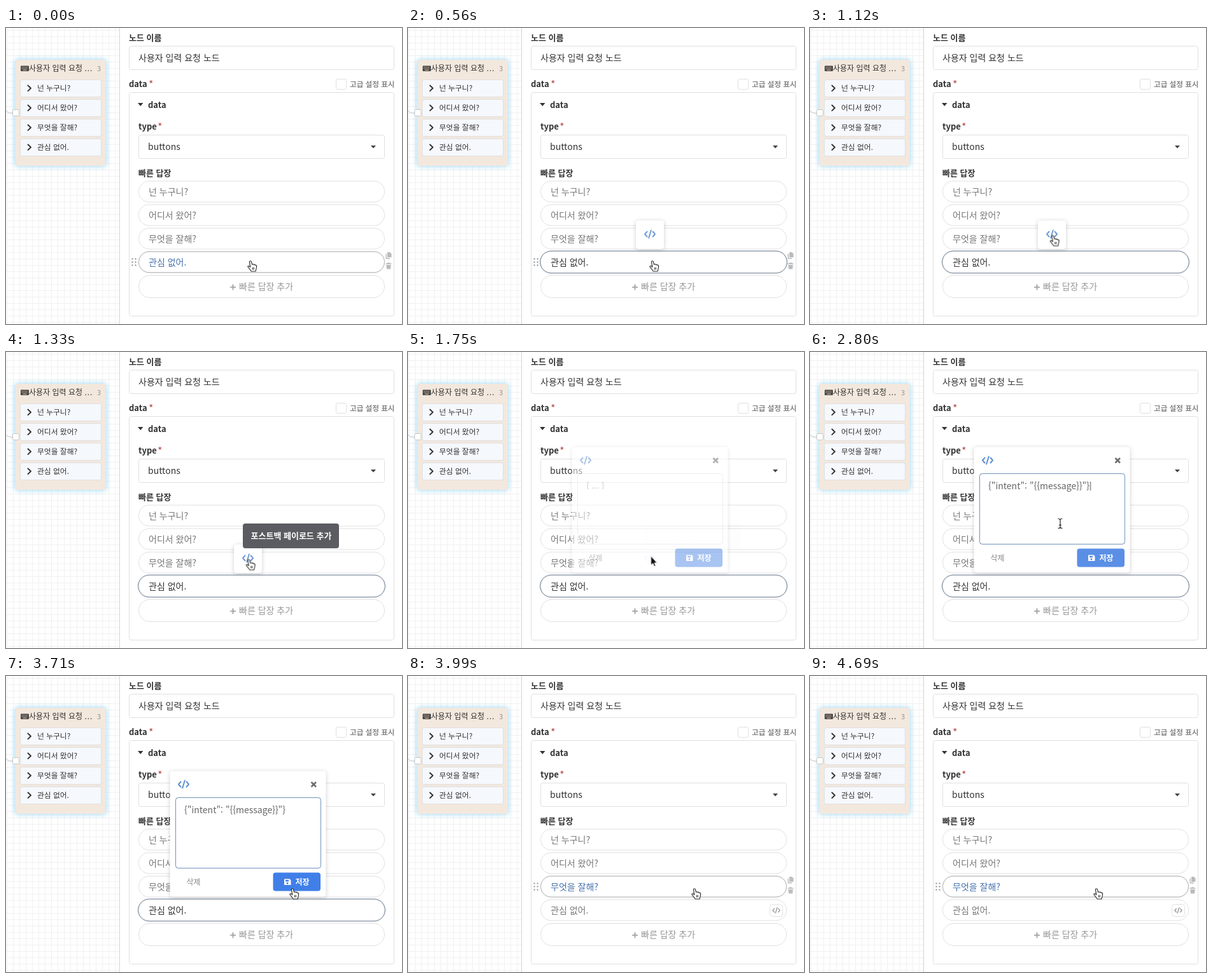
These frames come from a looping animation (622 px wide and 466 px high, 4.76 s). An HTML page:

```html
<!DOCTYPE html>
<html lang="ko">
<head>
<meta charset="utf-8">
<title>빠른 답장 편집</title>
<style>
html, body { margin: 0; width: 100%; height: 100%; overflow: hidden; background: #fff; }
svg { display: block; width: 622px; height: 466px; }
text { font: 14px "Noto Sans CJK KR", "Noto Sans CJK JP", "Noto Sans CJK", sans-serif; fill: #333; white-space: pre; }
.label { font-size: 13px; font-weight: 700; }
.small { font-size: 12px; }
.item { font-size: 11.8px; }
.bold { font-weight: 700; }
.req { font-size: 13px; fill: #c0585c; font-weight: 700; }
.option { fill: #777; }
.box { fill: #fff; stroke: #e0e0e0; }
.hovered { fill: none; stroke: #b2b2b2; }
.focused { fill: none; stroke: #6c8096; }
.field { fill: none; stroke: #6f93bd; }
.line { fill: none; stroke-linecap: round; stroke-linejoin: round; }
.card { fill: #fff; filter: drop-shadow(0 1px 3px rgba(0, 0, 0, .2)); }
.node { fill: #f3e8dd; filter: drop-shadow(0 0 4px #8fd5f7); }

/* one timeline: 1% = 47.6ms */
.anim, .anim-hard { animation: 4760ms linear infinite; }
.anim-hard { animation-timing-function: step-end; }

.tools4 { animation-name: tools4; }
@keyframes tools4 { 0% { opacity: 1 } 17.65%, 100% { opacity: 0 } }
.edge4 { animation-name: edge4; }
@keyframes edge4 { 0%, 2.9% { opacity: 1 } 5.9%, 100% { opacity: 0 } }
.focus4 { animation-name: focus4; }
@keyframes focus4 { 0%, 2.9% { opacity: 0 } 5.9%, 79.4% { opacity: 1 } 83%, 100% { opacity: 0 } }
.text4 { animation-name: text4; }
@keyframes text4 { 0%, 2.9% { fill: #4672ae } 5.9%, 79.4% { fill: #333 } 83%, 100% { fill: #777 } }
.text3 { animation-name: text3; }
@keyframes text3 { 0%, 80.8% { fill: #777 } 84%, 100% { fill: #4672ae } }
.late { animation-name: late; }
@keyframes late { 0%, 80.8% { opacity: 0 } 84%, 100% { opacity: 1 } }

.popup { animation-name: popup; }
@keyframes popup { 0%, 4.4% { opacity: 0 } 7.4%, 35.2% { opacity: 1 } 37%, 100% { opacity: 0 } }
.tip { animation-name: tip; }
@keyframes tip { 0%, 25.8% { opacity: 0 } 27.9%, 33.8% { opacity: 1 } 36.8%, 100% { opacity: 0 } }
.dialog { animation-name: dialog; }
@keyframes dialog { 0%, 35.2% { opacity: 0 } 38.2%, 79.4% { opacity: 1 } 82.4%, 100% { opacity: 0 } }
.edit { animation-name: edit; }
@keyframes edit { 0%, 50% { opacity: 0 } 52.9%, 100% { opacity: 1 } }
.hint { animation-name: hint; }
@keyframes hint { 0% { opacity: 1 } 58.8%, 100% { opacity: 0 } }
.typed { animation-name: typed; }
@keyframes typed { 0% { opacity: 0 } 58.8%, 100% { opacity: 1 } }
.caret { animation-name: caret; }
@keyframes caret {
  0% { opacity: 0; transform: translateX(281px) }
  51.4% { opacity: 1; transform: translateX(281px) }
  58.8% { opacity: 1; transform: translateX(440.5px) }
  70.5%, 100% { opacity: 0; transform: translateX(440.5px) }
}
.save { animation-name: save; }
@keyframes save { 0%, 66% { fill: #5a8fe6 } 69.1%, 100% { fill: #407fe8 } }

.pointer { animation-name: pointer; }
@keyframes pointer {
  0%, 14.7% { transform: translate(384px, 366.7px); animation-timing-function: ease-in-out }
  22%, 44% { transform: translate(381.5px, 326.7px); animation-timing-function: ease-in-out }
  51.4%, 58.9% { transform: translate(393px, 270px); animation-timing-function: ease-in-out }
  69.1%, 100% { transform: translate(450px, 334.7px) }
}
.hand { animation-name: hand; }
@keyframes hand { 0% { opacity: 1 } 36.7% { opacity: 0 } 66.2%, 100% { opacity: 1 } }
.arrow { animation-name: arrow; }
@keyframes arrow { 0% { opacity: 0 } 36.7% { opacity: 1 } 47.5% { opacity: 0 } 64% { opacity: 1 } 66.2%, 100% { opacity: 0 } }
.beam { animation-name: beam; }
@keyframes beam { 0% { opacity: 0 } 47.5% { opacity: 1 } 64%, 100% { opacity: 0 } }
</style>
</head>
<body>
<svg viewBox="0 0 622 466">
  <defs>
    <pattern id="grid" width="10" height="10" x="1" y="3" patternUnits="userSpaceOnUse">
      <path d="M.5 0V10M0 .5H10" stroke="#f1f1f1" fill="none"/>
    </pattern>
    <g id="code" class="line" stroke-width="2">
      <path d="M-4.5-4L-8 0L-4.5 4M4.5-4L8 0L4.5 4M1.8-6L-1.8 6"/>
    </g>
    <g id="tools">
      <path d="M197.5 363.5h2m3 0h2m-7 5h2m3 0h2m-7 5h2m3 0h2" stroke="#8c8c8c" stroke-width="2"/>
      <path d="M599 353h4l2.5 2.5V361H599ZM596.5 355.5H598V362h5v1.5h-6.5Z" fill="#bbb"/>
      <path d="M596.5 370.5h2.5v-1h4v1h2.5v1.500h-9ZM597.3 373h7.4l-.6 6.5h-6.2Z" fill="#bbb"/>
    </g>
    <rect id="pill" x="208.5" width="386" height="33" rx="16.5"/>
  </defs>

  <rect width="178" height="466" fill="url(#grid)"/>
  <path d="M178.5 0V466" stroke="#d3d3d3"/>
  <path d="M0 130Q4 135 11 134" stroke="#b9c8d2" fill="none"/>
  <rect class="node" x="14.5" y="50" width="142.5" height="167" rx="4"/>
  <rect x="10.5" y="128.5" width="10" height="10" rx="2" fill="#fff" stroke="#c9c5c0"/>
  <rect x="23" y="59.5" width="13" height="8.5" rx="1" fill="#494541"/>
  <path d="M24.5 61.8h10m-10 2h10" stroke="#e5dad0" stroke-dasharray="1 1"/>
  <path d="M26.5 66.2h6" stroke="#e5dad0"/>
  <text class="small" x="36" y="68">사용자 입력 요청 <tspan letter-spacing="1">...</tspan></text>
  <text x="143" y="68" style="font-size:11px;fill:#9a9188">3</text>
  <g id="items"></g>

  <text class="label" x="193" y="19.5">노드 이름</text>
  <rect class="box" x="193.5" y="28.5" width="416" height="37" rx="3"/>
  <text x="208" y="52">사용자 입력 요청 노드</text>
  <text class="label" x="193" y="93">data</text>
  <text class="req" x="224.5" y="92">*</text>
  <rect class="box" x="518.5" y="80.5" width="16" height="16" rx="2"/>
  <text class="bold" x="540" y="92.5" style="font-size:11.6px;fill:#888">고급 설정 표시</text>
  <rect class="box" x="193.5" y="101.5" width="416" height="352" rx="3"/>
  <path d="M207 118h8.500l-4.250 5Z" fill="#333"/>
  <text class="label" x="223" y="126">data</text>
  <text class="label" x="208" y="160">type</text>
  <text class="req" x="238.5" y="159">*</text>
  <rect class="box" x="208.5" y="168.5" width="386" height="37" rx="3"/>
  <text x="223" y="192">buttons</text>
  <path d="M573 185h8l-4 4.500Z" fill="#444"/>
  <text class="label" x="208" y="233">빠른 답장</text>

  <g id="options"></g>
  <rect class="box" x="208.5" y="389.5" width="386" height="35" rx="17.5"/>
  <path d="M352 408h9m-4.500-4.500v9" stroke="#999" stroke-width="1.6"/>
  <text x="366" y="412" style="fill:#999">빠른 답장 추가</text>

  <use href="#pill" y="352" class="hovered anim edge4"/>
  <rect class="focused anim focus4" x="207.5" y="351" width="388" height="35" rx="17.5"/>
  <use href="#tools" class="anim-hard tools4"/>
  <g class="anim late">
    <use href="#pill" y="315" class="hovered"/>
    <use href="#tools" y="-37"/>
    <rect class="box" x="568.5" y="359.5" width="20" height="19" rx="4"/>
    <use href="#code" transform="translate(578.5 369) scale(.7)" stroke="#999"/>
  </g>

  <g class="anim popup">
    <rect class="card" x="358" y="303" width="44" height="45" rx="4"/>
    <use href="#code" transform="translate(380 324.5)" stroke="#6f9bd3"/>
  </g>
  <g class="anim tip">
    <rect x="372" y="270" width="151" height="39" rx="4" fill="#5b5c61"/>
    <text class="label" x="384.5" y="294" style="fill:#fff">포스트백 페이로드 추가</text>
  </g>

  <g class="anim dialog">
    <rect class="card" x="257.5" y="149.5" width="245" height="198" rx="4"/>
    <use href="#code" transform="translate(279 170.5)" stroke="#5f90cf"/>
    <path d="M479.5 167l7.5 7.500m0-7.500l-7.500 7.500" stroke="#6c6c6c" stroke-width="2.5"/>
    <rect class="box" x="266.5" y="191.5" width="228" height="111" rx="4"/>
    <rect class="field anim edit" x="266.5" y="191.5" width="228" height="111" rx="4"/>
    <text class="bold anim-hard hint" x="280" y="215" style="font-size:12.5px;fill:#bdbdbd">{ ... }</text>
    <text class="anim-hard typed" x="280" y="216" style="fill:#666">{"intent": "{{message}}"}</text>
    <path class="anim-hard caret" d="M0 204V218" stroke="#444"/>
    <text class="small" x="283.5" y="328.5" style="fill:#888">삭제</text>
    <rect class="anim save" x="419.5" y="309.5" width="74.5" height="29" rx="4"/>
    <path d="M438 319.5h7.500l2 2V329H437v-8.500q0-1 1-1ZM439 321v2.500h5V321ZM442 324.800a1.500 1.500 0 1 0 .01 0Z" fill="#fff" fill-rule="evenodd"/>
    <text class="small bold" x="454.5" y="328.5" style="fill:#fff">저장</text>
  </g>

  <g class="anim pointer">
    <path class="anim-hard hand" fill="#fff" stroke="#222" stroke-width="1.1" stroke-linejoin="round"
      d="M-1.6 1.600C-1.500-.4 1-.4 1.4 1.300L2.500 5.500C3.400 4.600 4.900 5 5.2 6C6 5.200 7.300 5.600 7.700 6.700C9 6.300 9.700 7.200 9.600 8.600L9.200 11.500C8.900 13 8.300 14 8.100 16.200H1.200C.2 14-2.500 12-4 9.300C-4.500 8-3 7.300-1.700 8.400L-.2 9.700ZM3.300 10.200v3.300m2-3.300v3.300"/>
    <path class="anim-hard arrow" fill="#111" stroke="#fff" d="M0-5.700V9L3.200 6L5.200 10.800L7.500 9.800L5.500 5.200H9.700Z"/>
    <path class="anim-hard beam line" stroke="#222" stroke-width="1.2"
      d="M-3-7.500Q0-7.500 0-5.500Q0-7.500 3-7.500M0-5.500V5.500M-3 7.500Q0 7.500 0 5.500Q0 7.500 3 7.500M-1.500 2.500H1.500"/>
  </g>
</svg>
<script>
const replies = ['넌 누구니?', '어디서 왔어?', '무엇을 잘해?', '관심 없어.'];
const states = ['', '', 'anim text3', 'anim text4'];
const fill = (id, draw) => {
  document.getElementById(id).innerHTML = replies.map(draw).join('');
};

fill('items', (reply, i) => `<g transform="translate(0 ${i * 31})">
  <rect x="22.5" y="81.5" width="127" height="27" rx="3" fill="#f5f8fc" stroke="#dfdfe1"/>
  <path class="line" d="M34.5 90.5l4.500 4.300l-4.500 4.300" stroke="#333" stroke-width="1.9"/>
  <text class="item" x="49" y="99">${reply}</text></g>`);

fill('options', (reply, i) => `<g transform="translate(0 ${i * 37})">
  <use href="#pill" y="241" class="box"/>
  <text class="option ${states[i]}" x="224" y="263">${reply}</text></g>`);
</script>
</body>
</html>
```
